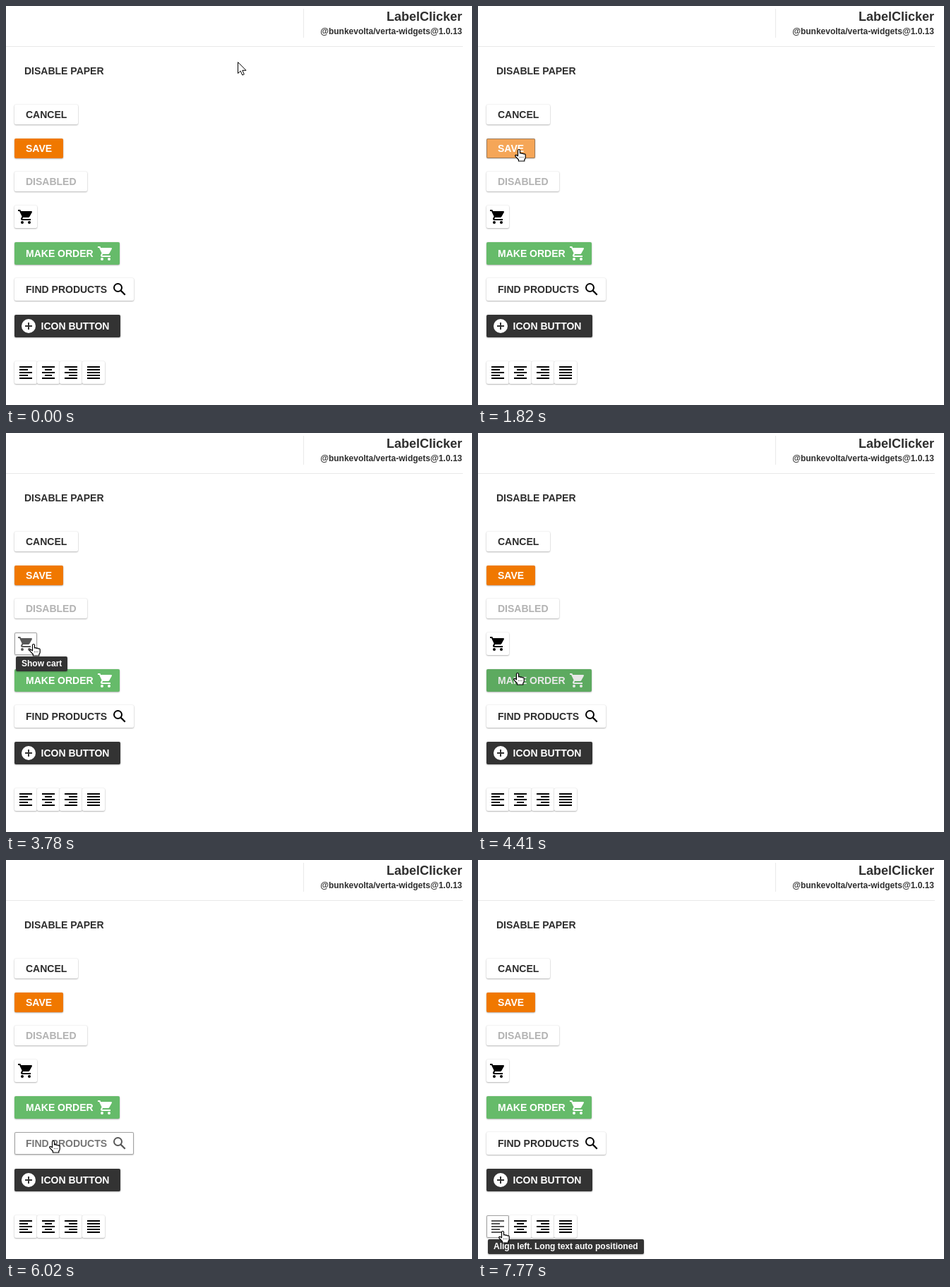
Write an HTML page that moves like this. It is 660 by 566 pixels and loops after 8000 ms.

```html
<!DOCTYPE html>
<html lang="en">
<head>
<meta charset="utf-8">
<title>Button showcase</title>
<style>
  html, body { margin: 0; width: 100%; height: 100%; overflow: hidden; background: #fff; }
  body { position: relative; font: bold 14px "Liberation Sans", Arial, sans-serif; color: #2e2e2e; }
  body > * { position: absolute; white-space: nowrap; }
  svg { position: absolute; overflow: visible; }

  .title { right: calc(100% - 646px); top: 4px; font-size: 18px; line-height: 22px; }
  .package { right: calc(100% - 646px); top: 29px; font-size: 12px; line-height: 14px; }
  .rule-x { left: 0; top: 57px; width: 647px; height: 1px; background: #e9e9e9; }
  .rule-y { left: 421px; top: 4px; width: 1px; height: 41px; background: #e9e9e9; }
  .flat { left: 26px; top: 78px; line-height: 28px; }

  .button {
    border-radius: 2px; background: #fff;
    box-shadow: 0 0 2px rgba(0, 0, 0, .14), 0 1px 2px rgba(0, 0, 0, .26);
  }
  .button span { position: absolute; top: 0; }
  .button::after { content: ""; position: absolute; inset: 0; border-radius: 2px; }
  .hover, .focus { opacity: .65; }
  .focus::after { box-shadow: inset 0 0 0 1px rgba(0, 0, 0, .55); }
  .active { opacity: 1; }
  .active::after { background: rgba(0, 0, 0, .09); box-shadow: none; }

  .tip {
    left: 14px; padding: 0 8px; border-radius: 2px; background: #333; color: #fff;
    font-size: 12px; line-height: 21px; box-shadow: 0 1px 2px rgba(0, 0, 0, .3);
    visibility: hidden;
  }
  .cursor { left: 0; top: 0; fill: #fff; stroke: #000; stroke-linejoin: round; }
</style>
</head>
<body>
<div class="rule-x"></div>
<div class="rule-y"></div>
<div class="title">LabelClicker</div>
<div class="package">@bunkevolta/verta-widgets@1.0.13</div>
<div class="flat">DISABLE PAPER</div>
<script>
const LOOP = 8000, STEP = 70;

const alignIcon = (from, to) => [4, 8, 12, 16, 20].map((y, i) =>
  `<path d="M${i % 2 ? from : 3} ${y}H${i % 2 ? to : 21}" stroke="currentColor" stroke-width="2"/>`).join('');

const icons = {
  cart: `<circle cx="7" cy="20" r="2"/><circle cx="17" cy="20" r="2"/>
    <path d="M1 2v2h2l3.6 7.6-1.35 2.44C4.5 15.4 5.5 17 7 17h12v-2H7.42c-.2 0-.3-.2-.22-.37L8.1 13h7.45
      c.75 0 1.41-.41 1.75-1.03l3.58-6.49C21.2 4.8 20.8 4 20 4H5.21l-.94-2z"/>`,
  search: `<g fill="none" stroke="currentColor" stroke-width="2">
    <circle cx="9.5" cy="9.5" r="5.5"/><path d="M13.6 13.6L19.7 19.7" stroke-width="2.2"/></g>`,
  plus: `<circle cx="12" cy="12" r="10"/><path d="M7 12h10M12 7v10" stroke="#333" stroke-width="2"/>`,
  left: alignIcon(3, 15),
  center: alignIcon(7, 17),
  right: alignIcon(9, 21),
  justify: alignIcon(3, 21)
};

const buttons = {
  cancel: { x: 12, y: 140, w: 90, h: 28, text: 'CANCEL' },
  save: { x: 12, y: 188, w: 69, h: 28, text: 'SAVE', bg: '#f07800', color: '#fff' },
  disabled: { x: 12, y: 235, w: 103, h: 28, text: 'DISABLED', color: '#b3b3b3', inert: true },
  cart: { x: 12, y: 283, w: 32, h: 32, icon: 'cart', tip: 'Show cart', tipY: 317 },
  order: { x: 12, y: 335, w: 149, h: 32, text: 'MAKE ORDER', icon: 'cart', iconX: 117, bg: '#66bb6a', color: '#fff' },
  find: { x: 12, y: 386, w: 169, h: 32, text: 'FIND PRODUCTS', icon: 'search', iconX: 137 },
  add: { x: 12, y: 438, w: 150, h: 32, text: 'ICON BUTTON', textX: 37.5, icon: 'plus', iconX: 8, bg: '#333', color: '#fff' },
  left: { x: 12, y: 504, w: 32, h: 32, icon: 'left', tip: 'Align left. Long text auto positioned', tipY: 538 },
  center: { x: 44, y: 504, w: 32, h: 32, icon: 'center' },
  right: { x: 76, y: 504, w: 32, h: 32, icon: 'right' },
  justify: { x: 108, y: 504, w: 32, h: 32, icon: 'justify' }
};

// Pointer moves: start, end, target x, target y
const origin = [328, 79];
const moves = [
  [0, 490, 95, 156],
  [1120, 1400, 58, 203],
  [2380, 2870, 38, 296],
  [3710, 4130, 52, 339],
  [4200, 4270, 56, 340],
  [4970, 5390, 67, 398],
  [6020, 6370, 82, 445],
  [7000, 7630, 35, 526]
];

// Clicks: button, press, release
const clicks = [
  ['cancel', 700, 770], ['cancel', 1050, 1190],
  ['save', 1680, 1820], ['save', 2170, 2310],
  ['cart', 3150, 3290], ['cart', 3570, 3640],
  ['order', 4410, 4550], ['order', 4830, 4970],
  ['find', 5530, 5600], ['find', 5880, 6020],
  ['add', 6510, 6580], ['add', 6860, 7000],
  ['left', 7700, 7770]
];

function addElement(className, html, style) {
  const el = document.createElement('div');
  el.className = className;
  el.innerHTML = html;
  Object.assign(el.style, style);
  document.body.append(el);
  return el;
}

for (const b of Object.values(buttons)) {
  const label = b.text ? `<span style="left:${b.textX ?? 16}px">${b.text}</span>` : '';
  const icon = b.icon ? `<svg width="24" height="24" fill="currentColor"
    style="left:${b.iconX ?? 4}px;top:4px">${icons[b.icon]}</svg>` : '';
  b.el = addElement('button', label + icon, {
    left: b.x + 'px', top: b.y + 'px', width: b.w + 'px', height: b.h + 'px', lineHeight: b.h + 'px',
    background: b.bg ?? '#fff', color: b.color ?? (b.text && !b.icon ? '#2e2e2e' : '')
  });
  if (b.icon && !b.color) b.el.querySelector('svg').style.color = '#000';
}
for (const b of Object.values(buttons)) {
  if (b.tip) b.tipEl = addElement('tip', b.tip, { top: b.tipY + 'px' });
}

const arrow = addElement('cursor', `<svg width="13" height="20">
  <path d="M.5 .7V16.6L4.2 13.2 6.8 19 9.3 17.9 6.8 12.3H12z"/></svg>`);
const hand = addElement('cursor', `<svg width="16" height="18">
  <path d="M4.5 9.8V2a1.5 1.5 0 0 1 3 0V6q1.4-.9 2.6.4 1.4-.7 2.4.5 2.7-.5 2.7 1.8V12q0 1.7-1.4 3V17H5.4V15
    L1 10.4Q.2 8.6 1.8 8.4 3 8.5 4.5 9.8z" stroke-width="1.2"/>
  <path d="M7.5 11v2M9.7 11v2M11.9 11v2" stroke-width=".8" stroke-dasharray="1 1"/></svg>`);

function pointerAt(t) {
  let [x, y] = origin;
  for (const [start, end, toX, toY] of moves) {
    if (t <= start) break;
    const p = Math.min(1, (t - start) / (end - start));
    const eased = (1 - Math.cos(Math.PI * p)) / 2;
    x += (toX - x) * eased;
    y += (toY - y) * eased;
  }
  return [Math.round(x), Math.round(y)];
}

function render(t) {
  const [x, y] = pointerAt(t);
  const click = clicks.findLast(c => t >= c[1]);
  let pointing = false;
  for (const [name, b] of Object.entries(buttons)) {
    const hover = !b.inert && x >= b.x && x < b.x + b.w && y >= b.y && y < b.y + b.h;
    const focus = click?.[0] === name;
    b.el.classList.toggle('hover', hover);
    b.el.classList.toggle('focus', focus);
    b.el.classList.toggle('active', focus && t < click[2]);
    if (b.tipEl) b.tipEl.style.visibility = hover ? 'visible' : 'hidden';
    pointing ||= hover;
  }
  arrow.style.visibility = pointing ? 'hidden' : 'visible';
  hand.style.visibility = pointing ? 'visible' : 'hidden';
  arrow.style.transform = `translate(${x}px, ${y}px)`;
  hand.style.transform = `translate(${x - 6}px, ${y}px)`;
}

const began = performance.now();
function tick() {
  const t = (performance.now() - began) % LOOP;
  render(Math.floor(t / STEP) * STEP);
  requestAnimationFrame(tick);
}
tick();
</script>
</body>
</html>
```
